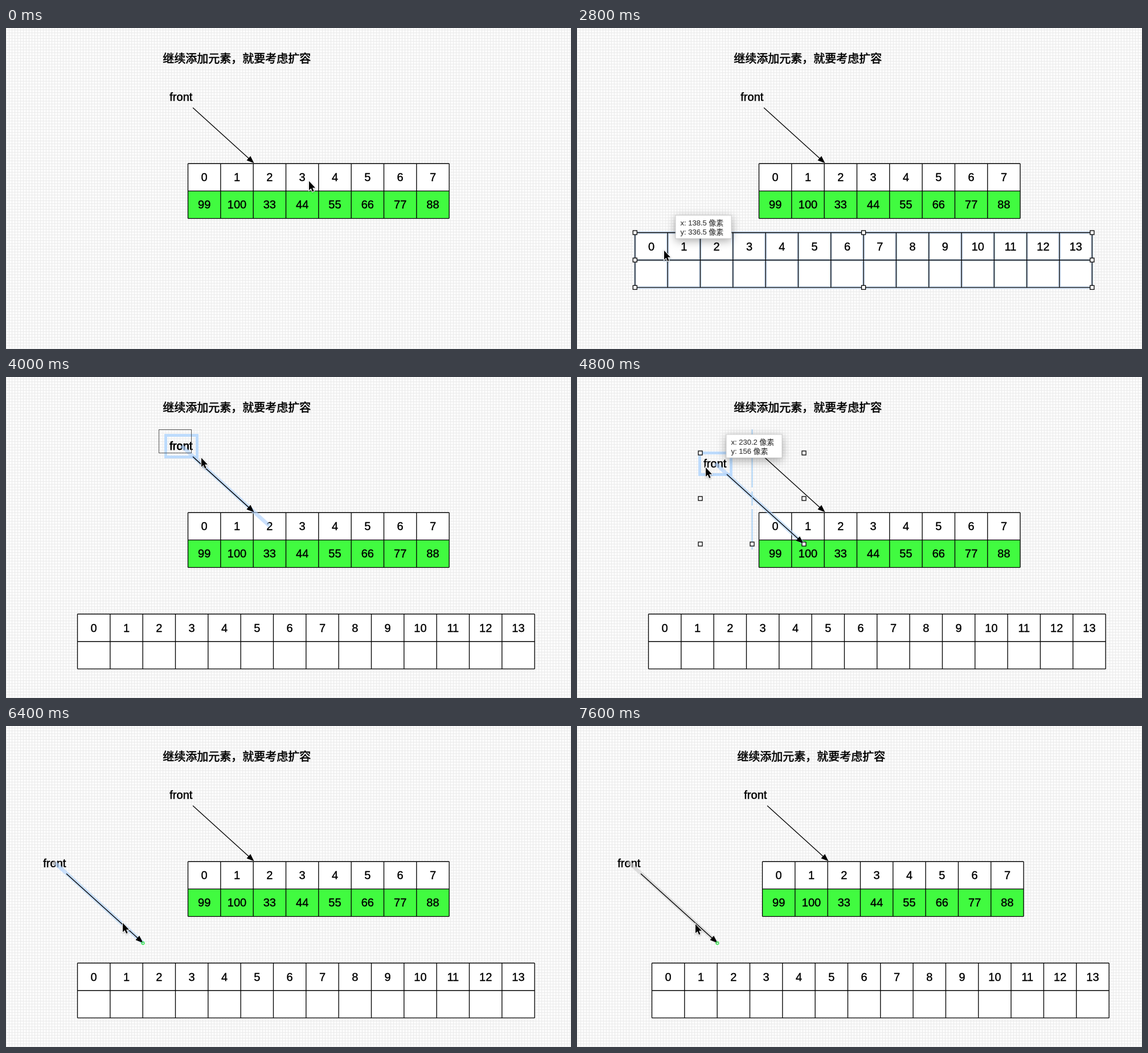
An HTML page with a canvas for the animation above (8000 ms loop, 992 by 564 pixels).

```html
<!DOCTYPE html>
<html lang="zh-CN">
<head>
<meta charset="utf-8">
<style>
html, body { margin: 0; width: 992px; height: 564px; overflow: hidden; background: #fcfcfc; }
canvas { display: block; }
</style>
</head>
<body>
<canvas id="stage" width="992" height="564"></canvas>
<script>
const c = document.getElementById('stage').getContext('2d');
const SANS = '"Liberation Sans", "Noto Sans CJK SC", "Noto Sans CJK", sans-serif';
const CJK = '"Noto Sans CJK SC", "Noto Sans CJK", sans-serif';
const BLUE = 'rgba(176,210,252,.65)', GREY = 'rgba(205,205,205,.6)';
const STEP = 400, PITCH = 57.33, ROW = 48.2;

// One state per step; group = offset of the copied pointer from the first one
const home = [125.5, 416.5], rest = [-222, 119.5];
const steps = [
  { cursor: [531, 268] },
  { cursor: [534, 277] },
  { cursor: [537, 286] },
  { cursor: [611, 229] },
  {},
  {},
  { cursor: [537, 286] },
  { cursor: [152, 390], table: [101.8, 359.5], tableSel: 1, tip: [173, 329, '138.5', '336.5'] },
  { cursor: [210, 493], table: [160, 462.5], tableSel: 1, tip: [231, 432, '184.9', '418.9'] },
  { cursor: [250, 141], table: home, tableSel: 1 },
  { cursor: [342, 141], table: home, group: [0, 0], glow: 1, band: 1 },
  { cursor: [290, 127], table: home, group: [0, 0], glow: 1, handles: 1 },
  { cursor: [225, 158], table: home, group: [-65, 31], glow: 1, handles: 1, guide: 1, tip: [262, 101, '230.2', '156'] },
  { cursor: [24, 247], table: home, group: [-266, 120], glow: 1, handles: 1, tip: [61, 190, '69.4', '227.2'] },
  { cursor: [79, 229], table: home, group: rest, glow: 1, handles: 1 },
  { cursor: [240, 371], table: home, group: rest, glow: 1, handles: 1 },
  { cursor: [204, 345], table: home, group: rest, lineSel: BLUE },
  { cursor: [199, 341], table: home, group: rest, lineSel: GREY, pan: 6 },
  { cursor: [207, 347], table: home, group: rest, lineSel: GREY, pan: 6 },
  { cursor: [207, 347], table: home, group: rest, lineSel: GREY, pan: 6 }
];

// A thin outline gives the slightly heavier strokes of the lettering
function text(str, x, y, { font = '20px ' + SANS, align = 'left', color = '#000', weight = .4 } = {}) {
  c.font = font;
  c.textAlign = align;
  c.fillStyle = c.strokeStyle = color;
  c.lineWidth = weight;
  c.lineJoin = 'round';
  c.fillText(str, x, y);
  c.strokeText(str, x, y);
  c.lineJoin = 'miter';
}

function line(x1, y1, x2, y2, color = '#000', width = 1.35) {
  c.strokeStyle = color;
  c.lineWidth = width;
  c.beginPath();
  c.moveTo(x1, y1);
  c.lineTo(x2, y2);
  c.stroke();
}

function frame(x, y, w, h, color, width) {
  c.strokeStyle = color;
  c.lineWidth = width;
  c.strokeRect(x, y, w, h);
}

function grid(pan) {
  c.fillStyle = '#fcfcfc';
  c.fillRect(0, 0, 992, 564);
  c.fillStyle = '#ebebeb';
  for (let x = pan % 5; x < 992; x += 5) c.fillRect(x, 0, 1, 564);
  for (let y = 3; y < 564; y += 5) c.fillRect(0, y, 992, 1);
}

function table(x, y, count, values, selected) {
  const w = count * PITCH;
  c.fillStyle = '#fff';
  c.fillRect(x, y, w, ROW * 2);
  if (values) {
    c.fillStyle = '#41fb40';
    c.fillRect(x, y + ROW, w, ROW);
  }
  const rules = (color, width) => {
    for (let r = 0; r < 3; r++) line(x, y + r * ROW, x + w, y + r * ROW, color, width);
    for (let i = 0; i <= count; i++) line(x + i * PITCH, y, x + i * PITCH, y + ROW * 2, color, width);
  };
  if (selected) rules('#d6e6f9', 5);
  rules('#000', 1.35);
  for (let i = 0; i < count; i++) {
    const mid = x + (i + .5) * PITCH;
    text(i, mid, y + 31, { align: 'center' });
    if (values) text(values[i], mid, y + ROW + 31, { align: 'center' });
  }
  if (selected) handles(x, y, w, ROW * 2);
}

function handles(x, y, w, h) {
  for (let i = 0; i < 9; i++) {
    if (i === 4) continue;
    const hx = x + (i % 3) * w / 2 - 3.5, hy = y + Math.floor(i / 3) * h / 2 - 3.5;
    c.fillStyle = '#fff';
    c.fillRect(hx, hy, 7, 7);
    frame(hx, hy, 7, 7, '#000', 1.3);
  }
}

function arrow(x1, y1, x2, y2) {
  line(x1, y1, x2 - 5, y2 - 4.5);
  c.save();
  c.translate(x2, y2);
  c.rotate(Math.atan2(y2 - y1, x2 - x1));
  c.fillStyle = '#000';
  c.beginPath();
  c.moveTo(0, 0);
  c.lineTo(-13, -5);
  c.lineTo(-13, 5);
  c.fill();
  c.restore();
}

function ring(x, y, r, color) {
  c.strokeStyle = color;
  c.lineWidth = 1.6;
  c.beginPath();
  c.arc(x, y, r, 0, 7);
  c.stroke();
}

function label() {
  text('front', 287.3, 128, { weight: .6 });
}

function pointer(s) {
  const [dx, dy] = s.group;
  const attached = !dx && !dy;
  c.save();
  c.translate(dx, dy);
  if (s.glow) frame(280.5, 102.5, 55, 38, '#bddbfc', 5);
  label();
  line(308, 121, 463, 262, s.glow ? BLUE : s.lineSel, 6.5);
  if (attached) arrow(328, 140, 435.5, 237.5);
  else arrow(328, 140, 462.5, 261.5);
  if (s.lineSel) {
    ring(307, 121.5, 2.3, '#aaa');
    ring(462.5, 262, 2.3, '#38e850');
  }
  if (s.guide) {
    c.setLineDash([102, 7, 25, 6, 71]);
    line(372.5, 61, 372.5, 272, '#9bcaf3', 1.6);
    c.setLineDash([]);
  }
  if (s.handles) handles(281.5, 102.5, 182, 160);
  c.restore();
}

function tooltip([x, y, vx, vy]) {
  c.save();
  c.shadowColor = 'rgba(0,0,0,.35)';
  c.shadowBlur = 16;
  c.shadowOffsetY = 4;
  c.fillStyle = '#fff';
  c.fillRect(x, y, 98, 41);
  c.restore();
  frame(x, y, 98, 41, '#c4c4c4', .8);
  const style = { font: '13px ' + SANS, color: '#333', weight: .1 };
  text(`x: ${vx} 像素`, x + 8.5, y + 18, style);
  text(`y: ${vy} 像素`, x + 8.5, y + 34, style);
}

function cursor([x, y]) {
  const p = new Path2D('M0 0V16L3.6 12.7 6.2 18.7 8.6 17.6 6.1 11.8H11Z');
  c.save();
  c.translate(x + 1, y + 1);
  c.shadowColor = 'rgba(0,0,0,.3)';
  c.shadowBlur = 3;
  c.shadowOffsetY = 1;
  c.strokeStyle = '#fff';
  c.lineWidth = 2;
  c.stroke(p);
  c.shadowColor = 'transparent';
  c.fillStyle = '#000';
  c.fill(p);
  c.restore();
}

function draw(s) {
  const pan = s.pan || 0;
  grid(pan);
  c.save();
  c.translate(pan, 0);
  text('继续添加元素，就要考虑扩容', 275.3, 61, { font: '500 20px ' + CJK, weight: .6 });
  table(319.5, 238.2, 8, [99, 100, 33, 44, 55, 66, 77, 88]);
  if (s.table) table(...s.table, 14, null, s.tableSel);
  label();
  arrow(328, 140, 435.5, 237.5);
  if (s.group) pointer(s);
  if (s.band) frame(268.5, 92.5, 57, 41, '#555', 1);
  c.restore();
  if (s.tip) tooltip(s.tip);
  if (s.cursor) cursor(s.cursor);
}

function tick() {
  draw(steps[Math.floor(performance.now() / STEP) % steps.length]);
  requestAnimationFrame(tick);
}
tick();
</script>
</body>
</html>
```
